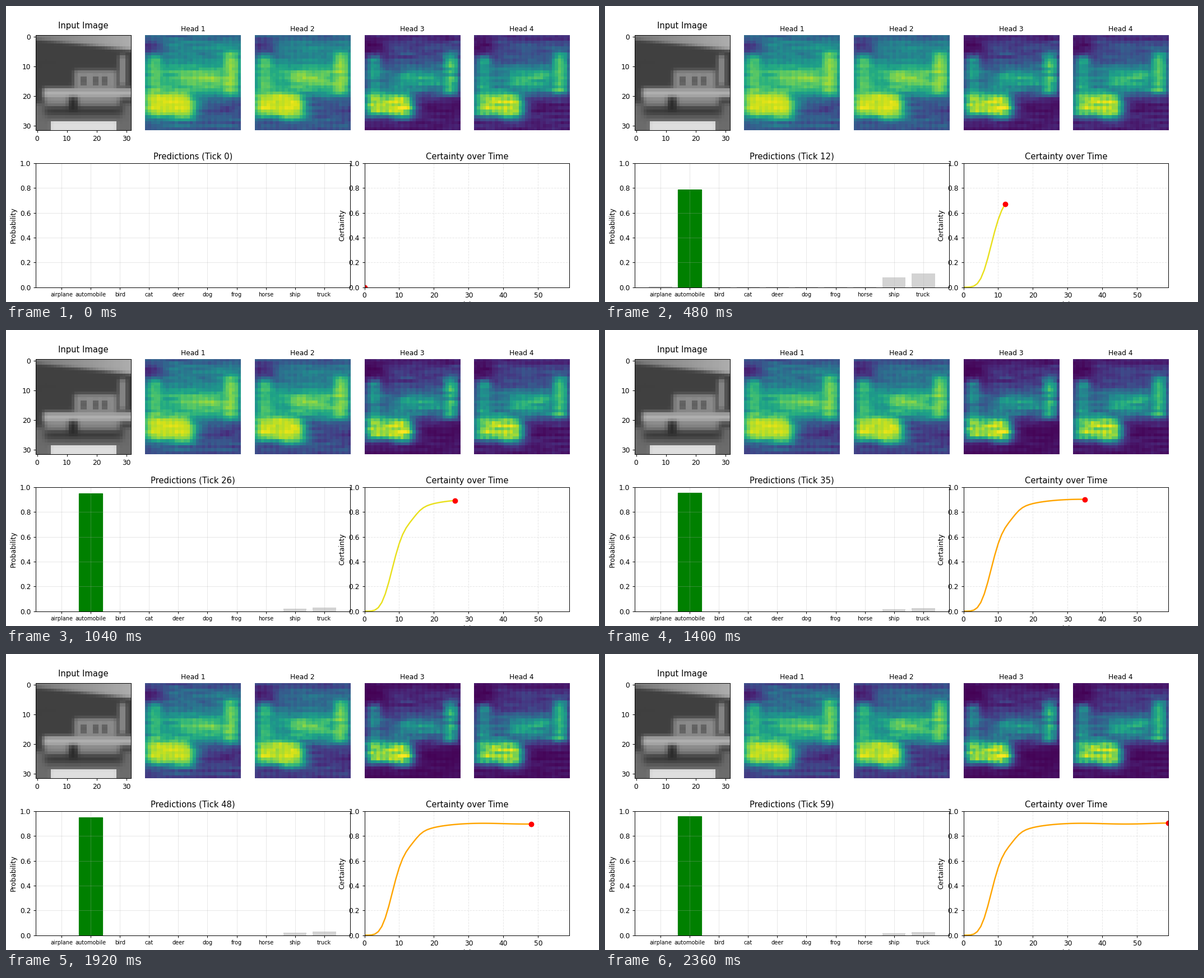
These frames come from a looping animation (1058 by 529 pixels, 2.4 s). A matplotlib script:

```python
import numpy as np
import matplotlib.pyplot as plt
from matplotlib.animation import FuncAnimation
from matplotlib.gridspec import GridSpec

TICKS = 60
N = 32
LABELS = ["airplane", "automobile", "bird", "cat", "deer",
          "dog", "frog", "horse", "ship", "truck"]
TRUE = LABELS.index("automobile")

T = np.arange(TICKS)
X, Y = np.meshgrid(np.arange(N) + 0.5, np.arange(N) + 0.5)
CHECKER = np.cos(np.pi * (X - 0.5)) + np.cos(np.pi * (Y - 0.5))


def edge(d, soft):
    return 1 / (1 + np.exp(-np.clip(d / soft, -40, 40)))


def blend(field, value, x0, x1, y0, y1, soft=0.4):
    """Mix a soft-edged box of one value into the field."""
    mask = (edge(X - x0, soft) * edge(x1 - X, soft)
            * edge(Y - y0, soft) * edge(y1 - Y, soft))
    return field + (value - field) * mask


def car_photo():
    img = 0.25 + 0.015 * np.cos(np.pi * X)
    sky = edge(1.6 + 3.6 * X / N - Y, 0.3)
    img += (0.48 + 0.2 * X / N - img) * sky
    img = blend(img, 0.42, -9, 41, 23, 41)            # ground
    img = blend(img, 0.20, 3, 29, 22, 27, 0.7)        # shadow
    img = blend(img, 0.55, 13, 27, 12, 18)            # cabin
    for x in (15, 19, 22):
        img = blend(img, 0.36, x, x + 2, 14, 17, 0.2)
    img = blend(img, 0.60, 28, 30, 7, 17)             # post
    img = blend(img, 0.52, 3, 28, 20, 24, 0.5)        # body
    img = blend(img, 0.70, 2.5, 41, 18, 21)           # hood line
    img = blend(img, 0.16, 11, 14, 21, 25.5)          # wheel
    return blend(img, 0.87, 5, 27, 29, 41, 0.15)      # kerb


def attention_scene():
    v = np.full((N, N), 0.42)
    v = blend(v, 0.10, -9, 6.5, -9, 8, 1.2)           # dark corners
    v = blend(v, 0.26, -9, 41, -9, 2, 0.6)
    v = blend(v, 0.14, 18, 41, 21, 28, 1.4)
    v = blend(v, 0.22, -9, 41, 28, 41, 0.7)
    v = blend(v, 0.61, 5, 28, 10.5, 20, 1.0)          # middle band
    v = blend(v, 0.80, 12, 25, 12.5, 17, 0.8)
    v = blend(v, 0.71, 1, 5.5, 7, 20, 0.6)            # side columns
    v = blend(v, 0.82, 26.5, 31, 6, 20, 0.6)
    v = blend(v, 0.80, 9, 16.5, 21, 28, 0.8)          # lower left blob
    return blend(v, 0.94, 0.5, 15, 19.5, 27, 0.7)


def with_streaks(field, seed):
    """Add a fine grid and horizontally smeared noise."""
    noise = np.random.default_rng(seed).normal(0, 0.03, (N, N + 4))
    streaks = sum(noise[:, i:i + N] for i in range(5)) / 5 ** 0.5
    return np.clip(field + streaks + 0.015 * CHECKER, 0.01, 1)


GAMMAS = [0.85, 0.90, 1.80, 1.60]
SCENE = attention_scene()
HEADS = [with_streaks(SCENE, seed) for seed in range(len(GAMMAS))]


def certainty(t):
    plateau = 0.9025 + 0.0045 * np.cos(2 * np.pi * (t - 32) / 30)
    rise = t ** 4.2 / (t ** 4.2 + 9.0 ** 4.2)
    return plateau * rise - 0.03 * np.exp(-((t - 13.5) / 2.5) ** 2)


CERT = certainty(T.astype(float))


def probabilities(t):
    """Certainty moves mass to the true class, then to its two rivals."""
    auto = 0.104 + 0.92 * CERT[t] ** 0.75
    rest = 1 - auto
    g = np.sqrt(min(CERT[t] / 0.9, 1))
    ship = rest * (0.118 + 0.300 * g)
    truck = rest * (0.115 + 0.465 * g)
    w = (1 - 0.16 * min(t / 7, 1)) ** np.arange(7)
    w *= (rest - ship - truck) / w.sum()
    return np.r_[w[0], auto, w[1:], ship, truck]


fig = plt.figure(figsize=(12, 6), dpi=529 / 6, facecolor="white")
gs = GridSpec(2, 5, figure=fig, left=0.05, right=0.95, bottom=0.05, top=0.95,
              hspace=0.15, wspace=0.15)

ax_in = fig.add_subplot(gs[0, 0])
ax_in.imshow(car_photo(), cmap="gray", vmin=0, vmax=1, interpolation="nearest")
ax_in.set_xticks(range(0, N, 10))
ax_in.set_yticks(range(0, N, 10))
ax_in.set_title("Input Image", fontsize=12, pad=10)

maps = []
for i, head in enumerate(HEADS):
    ax = fig.add_subplot(gs[0, i + 1])
    maps.append(ax.imshow(head, cmap="viridis", vmin=0, vmax=1,
                          interpolation="nearest"))
    ax.set_title(f"Head {i + 1}", fontsize=10)
    ax.axis("off")

ax_bar = fig.add_subplot(gs[1, :3])
bars = ax_bar.bar(range(10), probabilities(0), color="lightgray")
ax_bar.set_xlim(-0.89, 9.89)
ax_bar.set_ylim(0, 1)
ax_bar.set_xticks(range(10), LABELS, fontsize=8)
ax_bar.set_ylabel("Probability")
ax_bar.grid(True, alpha=0.3)
title = ax_bar.set_title("Predictions (Tick 0)", fontsize=12)

ax_cert = fig.add_subplot(gs[1, 3:])
line, = ax_cert.plot([], [], lw=2)
dot, = ax_cert.plot([], [], "ro", ms=7)
ax_cert.set_xlim(0, TICKS - 1)
ax_cert.set_ylim(0, 1)
ax_cert.set_xlabel("tick", labelpad=2.8)
ax_cert.set_ylabel("Certainty")
ax_cert.set_title("Certainty over Time", fontsize=12)
ax_cert.grid(True, linestyle="--", alpha=0.3)


def update(t):
    u = np.clip((t - 10) / 40, 0, 1)
    ease = u * u * (3 - 2 * u)
    for im, head, gamma in zip(maps, HEADS, GAMMAS):
        im.set_data(head ** (gamma * (1 + 0.35 * ease)))

    p = probabilities(t)
    best = np.argmax(p)
    for i, (bar, h) in enumerate(zip(bars, p)):
        bar.set_height(h)
        if i == TRUE:
            bar.set_color("green")
        elif i == best:
            bar.set_color("red")
        else:
            bar.set(facecolor="lightgray", edgecolor="none")
    title.set_text(f"Predictions (Tick {t})")

    line.set_data(T[:t + 1], CERT[:t + 1])
    line.set_color("#e9e01e" if t < TICKS // 2 else "orange")
    dot.set_data([t], [CERT[t]])
    return [*maps, *bars, title, line, dot]


anim = FuncAnimation(fig, update, frames=TICKS, interval=40,
                     repeat=True, repeat_delay=0)
plt.show()
```
